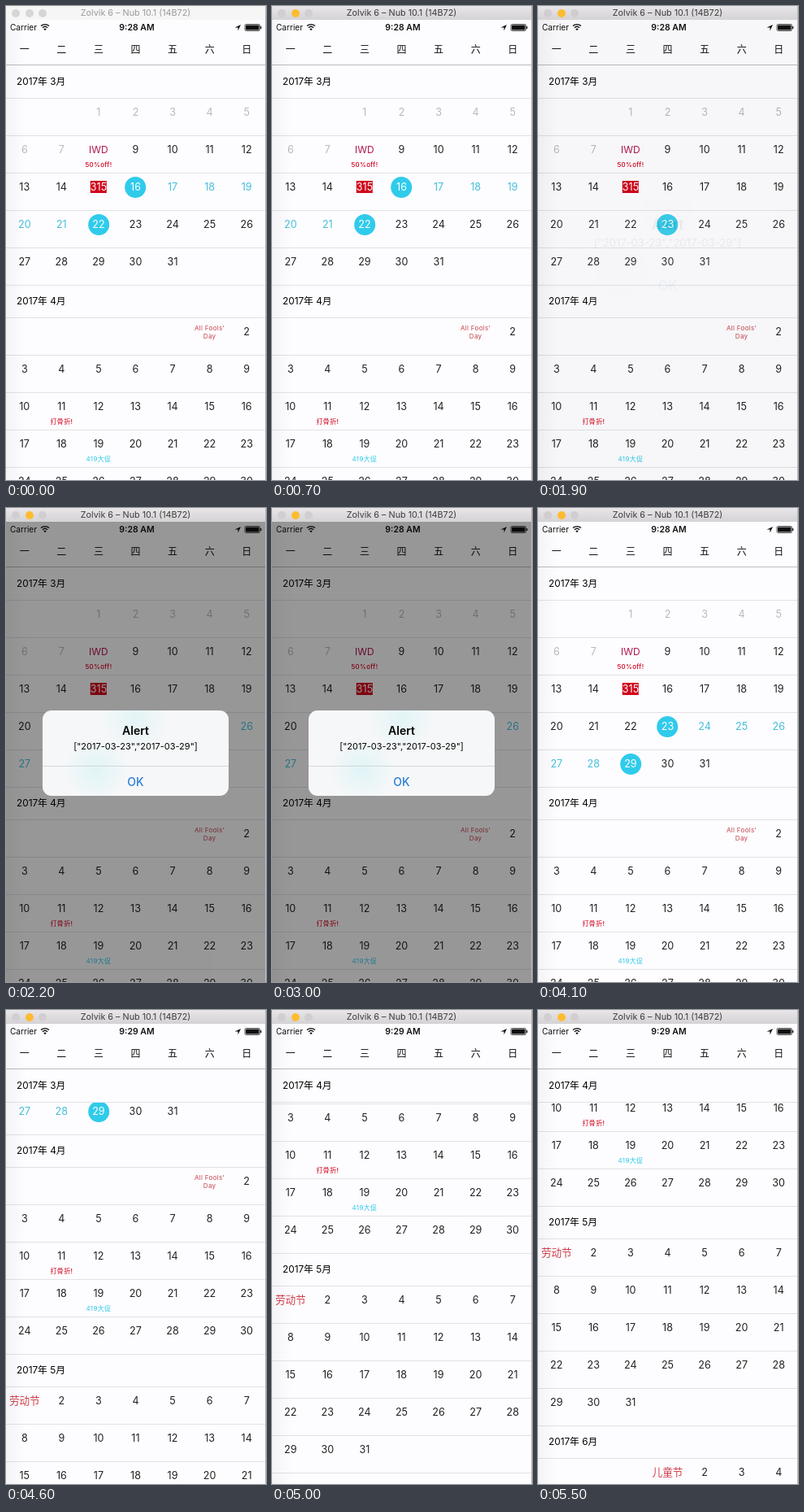
Animation of 320x583 px, one loop 5.6 s. Source, as an HTML page:

```html
<!DOCTYPE html>
<html lang="zh">
<head>
<meta charset="utf-8">
<title>Calendar range picker</title>
<style>
  :root { --cyan: #30cbeb; --red: #d0021b; --line: #e2e2e5; --paper: #fdfcfe; }
  * { box-sizing: border-box; }
  html, body { margin: 0; width: 100%; height: 100%; overflow: hidden; }
  body { background: #fff; font-family: Inter, "Noto Sans CJK SC", "Noto Sans CJK", sans-serif; color: #222; }
  #stage { position: absolute; left: 0; top: 0; width: 320px; height: 583px; overflow: hidden; background: #b9b9bb; }
  .bar, .app { position: absolute; left: 0; width: 319px; }

  .bar { top: 0; height: 17px; background: #f6f6f6; color: #9a9a9a; font-size: 10.8px; line-height: 17px; text-align: center; white-space: nowrap; }
  .bar i { position: absolute; top: 3.5px; width: 10px; height: 10px; border-radius: 50%; background: #d6d6d6; }
  .bar.focus { background: linear-gradient(#e8e6e8, #d4d2d4); color: #3c3c3c; }
  .bar.focus i { background: #d0ced0; }
  .bar.focus .mini { background: #fdbc30; }

  .app { top: 17px; height: 566px; background: var(--paper); overflow: hidden; }
  .status { position: absolute; left: 0; top: 0; width: 319px; height: 19px; line-height: 19px; color: #111; font-size: 10.1px; }
  .status span { position: absolute; left: 5px; }
  .status b { position: absolute; left: 0; width: 100%; padding-left: 3px; text-align: center; font-size: 10.5px; font-weight: 600; }
  .status svg { position: absolute; left: 0; top: 0; }

  .week, .row { display: grid; grid-template-columns: repeat(7, 1fr); text-align: center; }
  .week { position: absolute; left: 0; top: 19px; width: 319px; height: 37px; line-height: 36px; font-size: 12px; color: #111; border-bottom: 1px solid #bcbcbf; }
  .list { position: absolute; left: 0; top: 57px; width: 319px; height: 509px; overflow: hidden; isolation: isolate; }
  h2 { position: sticky; top: 0; z-index: 1; height: 40px; margin: 0; padding-left: 13px; background: var(--paper);
       border-bottom: 1px solid var(--line); font: 400 11.8px/38px Inter, "Noto Sans CJK SC", "Noto Sans CJK", sans-serif; color: #000; }
  .row { height: 46px; border-bottom: 1px solid var(--line); font-size: 12.6px; }
  .cell { position: relative; height: 45px; }
  .cell span { position: absolute; left: 50%; top: 4px; min-width: 25.6px; height: 25.6px; line-height: 26px; border-radius: 13px; transform: translateX(-50%); white-space: nowrap; }
  .cell small { position: absolute; left: 0; right: 0; top: 29px; font-size: 8px; line-height: 12px; letter-spacing: .3px; font-weight: 500; color: var(--red); }
  .past { color: #b9b9bb; }
  .cell .women { color: #b01650; font-size: 12px; }
  .cell .feast { color: #cc3b48; }
  .cell .fools { top: 7px; font-size: 8px; line-height: 10px; letter-spacing: .3px; color: #c4444e; }
  .cell .sale { min-width: 0; top: 9px; height: 15px; line-height: 16px; border-radius: 0; background: var(--red); color: #fff; }
  .cell small.cool { color: var(--cyan); font-weight: 400; }
  .mid span { color: #45bfda; }
  .end span { background: var(--cyan); color: #fff; }

  .edge { position: absolute; left: 0; top: 0; width: 24px; height: 100%; background: linear-gradient(90deg, rgba(0, 0, 0, .035), transparent); }
  .dim { position: absolute; inset: 0; background: rgba(0, 0, 0, .4); }
  .alert { position: absolute; left: 45px; top: 232px; width: 229px; height: 105px; border-radius: 11px; text-align: center; white-space: nowrap; color: #000;
           background: radial-gradient(circle at 114px 10px, rgba(190, 240, 245, .35), transparent 42px),
                       radial-gradient(circle at 66px 72px, rgba(190, 240, 245, .4), transparent 40px), #f6f7f8; }
  .alert > * { position: absolute; left: 0; width: 100%; line-height: 20px; }
  .alert b { top: 15px; font-size: 14px; font-weight: 600; }
  .alert p { top: 34px; margin: 0; font-size: 11px; }
  .alert em { top: 68px; height: 37px; border-top: 1px solid #d3d6d9; font: 500 14px/37px Inter, sans-serif; color: #2a7ed8; }
</style>
</head>
<body>
<div id="stage">
  <div class="bar" id="bar">
    <i style="left:7px"></i><i class="mini" style="left:23.5px"></i><i style="left:40px"></i>
    Zolvik 6 – Nub 10.1 (14B72)
  </div>
  <div class="app">
    <div class="status">
      <span>Carrier</span><b id="clock"></b>
      <svg width="319" height="19" fill="none" stroke="#111" stroke-width="1.4">
        <path d="M43 7.6a7.2 7.2 0 0 1 10 0M44.9 9.7a4.6 4.6 0 0 1 6.2 0"/>
        <path d="M46.3 11.3a2.6 2.6 0 0 1 3.4 0L48 13.2z" fill="#111" stroke="none"/>
        <path d="M289 6l-3.5 7.5v-4h-4z" fill="#111" stroke="none"/>
        <rect x="294" y="5.5" width="18.5" height="8" rx="1.6" stroke-width=".7"/>
        <rect x="295" y="6.5" width="16.5" height="6" rx=".8" fill="#111" stroke="none"/>
        <path d="M313.8 8v3" stroke-width="1.2"/>
      </svg>
    </div>
    <div class="week" id="week"></div>
    <div class="list" id="list"></div>
    <div class="edge"></div>
    <div class="dim" id="dim"></div>
    <div class="alert" id="alert">
      <b>Alert</b><p>["2017-03-23","2017-03-29"]</p><em>OK</em>
    </div>
  </div>
</div>
<script>
  const LOOP = 5600, STEP = 100;
  const el = id => document.getElementById(id);
  const clamp = x => Math.min(1, Math.max(0, x));

  // first: weekday column of day 1
  const months = [
    { n: 3, days: 31, first: 2 },
    { n: 4, days: 30, first: 5 },
    { n: 5, days: 31, first: 0 },
    { n: 6, days: 30, first: 3 }
  ];
  const special = {
    '3-8': ['IWD', 'women', '50%off!'],
    '3-15': ['315', 'sale'],
    '4-1': ["All Fools'<br>Day", 'fools'],
    '4-11': ['11', '', '打骨折!'],
    '4-19': ['19', '', '419大促', 'cool'],
    '5-1': ['劳动节', 'feast'],
    '6-1': ['儿童节', 'feast']
  };

  function cellHtml(month, day) {
    if (day < 1 || day > month.days) return '<div class="cell"></div>';
    const [text, kind = '', note, tone = ''] = special[month.n + '-' + day] || [day];
    const past = month.n === 3 && day < 8 ? ' past' : '';
    const sub = note ? `<small class="${tone}">${note}</small>` : '';
    return `<div class="cell${past}" id="d${month.n}-${day}"><span class="${kind}">${text}</span>${sub}</div>`;
  }

  function monthHtml(month) {
    let html = `<section><h2>2017年 ${month.n}月</h2>`;
    for (let d = 1 - month.first; d <= month.days; d += 7) {
      html += '<div class="row">';
      for (let i = 0; i < 7; i++) html += cellHtml(month, d + i);
      html += '</div>';
    }
    return html + '</section>';
  }

  el('week').innerHTML = [...'一二三四五六日'].map(c => `<div>${c}</div>`).join('');
  el('list').innerHTML = months.map(monthHtml).join('');

  function select(from, to) {
    for (let d = 16; d <= 29; d++) {
      const list = el('d3-' + d).classList;
      list.toggle('end', d === from || d === to);
      list.toggle('mid', d > from && d < to);
    }
  }

  // finger drag, then a decaying fling
  function scrollAt(t) {
    if (t < 4600) return 190 * Math.pow(clamp((t - 4150) / 450), 1.1);
    return 400 - 210 * Math.exp((4600 - t) / 450);
  }

  function showAlert(t) {
    const u = clamp((t - 1850) / 350);
    const rise = u * u * (3 - 2 * u);
    const alpha = t < 3000 ? rise : (1 - clamp((t - 3000) / 300)) ** 2;
    el('dim').style.opacity = el('alert').style.opacity = alpha;
    el('alert').style.transform = `scale(${1.2 - 0.2 * rise})`;
  }

  function draw(t) {
    el('bar').classList.toggle('focus', t >= 700);
    el('clock').textContent = t < 4300 ? '9:28 AM' : '9:29 AM';
    if (t < 1000) select(16, 22);
    else if (t < 2000) select(23, 23);
    else select(23, 29);
    showAlert(t);
    el('list').scrollTop = Math.round(scrollAt(t));
  }

  const start = performance.now();
  function tick() {
    const t = (performance.now() - start) % LOOP;
    draw(Math.floor(t / STEP) * STEP);
    requestAnimationFrame(tick);
  }
  tick();
</script>
</body>
</html>
```
